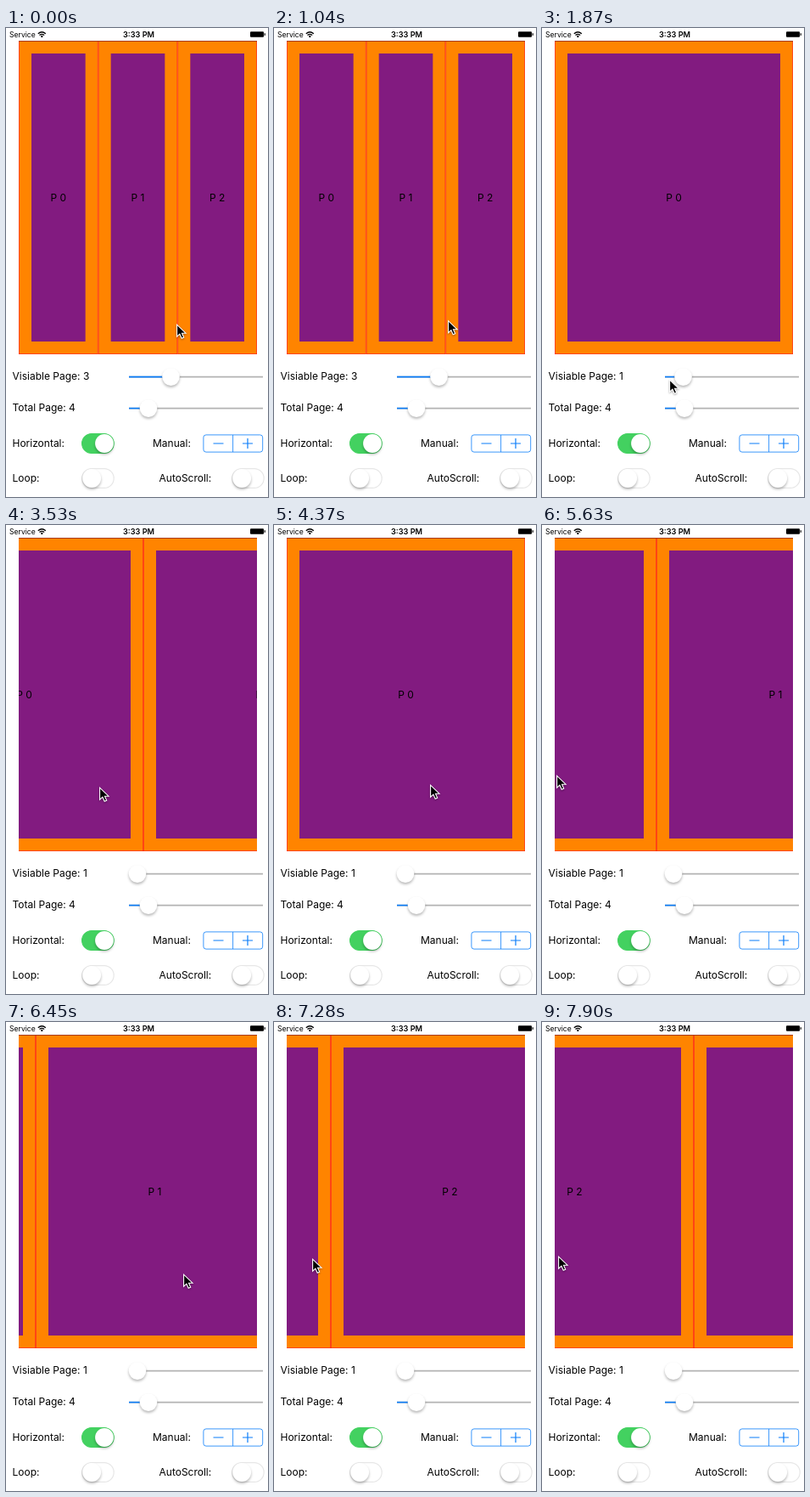
An HTML page for the animation above (8 s loop, 309 by 552 pixels).

```html
<!DOCTYPE html>
<html lang="en">
<head>
<meta charset="utf-8">
<title>Pager demo</title>
<style>
html, body { margin: 0; width: 100%; height: 100%; overflow: hidden; background: #fff; }
svg { display: block; width: 100vw; height: 100vh; }
text { font: 12px Inter, Roboto, sans-serif; fill: #000; }
.status { font-size: 8.6px; }
.clock { font-size: 9.2px; font-weight: 600; }
.middle { text-anchor: middle; }
.knob { fill: #fff; filter: drop-shadow(0 2px 1.5px rgba(0, 0, 0, .28)); }
.blue { fill: none; stroke: #0a7dfa; stroke-width: .8; }
#cursor { fill: #000; stroke: #fff; stroke-width: 1.1; filter: drop-shadow(0 1px 1px rgba(0, 0, 0, .35)); }
</style>
</head>
<body>
<svg viewBox="0 0 309 552">
  <defs><clipPath id="view"><rect x="15" y="15" width="281" height="369"/></clipPath></defs>

  <text class="status" x="4" y="11">Service</text>
  <g fill="none" stroke="#000" stroke-width="1.3">
    <path d="M37.8 6.8Q42.3 2.8 46.8 6.8M39.5 8.6Q42.3 6.2 45.1 8.6"/>
    <circle cx="42.3" cy="10" r=".5"/>
  </g>
  <text class="clock middle" x="156.5" y="11">3:33 PM</text>
  <rect x="288" y="4.3" width="16" height="6.4" rx="1"/>
  <rect x="304.6" y="6.2" width="1.2" height="2.6"/>

  <g clip-path="url(#view)">
    <g id="pages"></g>
    <path d="M15 15.5H296" stroke="#a83a10"/>
  </g>

  <text id="visible" x="7.5" y="414"></text>
  <text x="7.5" y="451">Total Page: 4</text>
  <text x="7.5" y="493">Horizontal:</text>
  <text x="173" y="493">Manual:</text>
  <text x="7.5" y="534">Loop:</text>
  <text x="180.5" y="534">AutoScroll:</text>

  <g class="blue">
    <rect x="232.9" y="478.9" width="69.8" height="20.2" rx="3"/>
    <path d="M267.6 479V499"/>
    <path d="M244.5 489H256.5M279 489H291M285 483V495" stroke-width="1.2"/>
  </g>
  <g id="controls"></g>
  <path id="cursor" d="M.6 1.2V15.2L3.9 12.2 6.2 17.3 8.7 16.2 6.5 11.2H11Z"/>
</svg>
<script>
const LOOP = 8000, TICK = 208;
const LEFT = 15, WIDTH = 281, PAGE_COUNT = 4;
const DRAG_GAIN = 1.1, SETTLE_RATE = 2, REST_GAP = 20;

// Where the pointer turns: tick, x, y.
const STOPS = [
  [1, 201, 348], [4, 213, 279], [6, 197, 408], [9, 150, 413], [12, 146, 420], [15, 232, 312],
  [17, 110, 308], [21, 184, 305], [24, 163, 299], [27, 17, 294], [28, 16, 294], [31, 209, 296],
  [33, 271, 284], [35, 45, 278], [37, 144, 276], [38, 19, 275]
];
const DRAGS = [
  { from: 15, to: 17, page: 0 },
  { from: 24, to: 28, page: 1 },
  { from: 33, to: 35, page: 2 },
  { from: 37, to: 38, page: 2 }
];

const $ = id => document.getElementById(id);
const clamp = v => Math.min(1, Math.max(0, v));
const mix = (a, b, p) => a + (b - a) * p;
const ease = p => (1 - Math.cos(Math.PI * p)) / 2;

function set(node, attrs) {
  for (const name in attrs) node.setAttribute(name, attrs[name]);
}

function add(parent, tag, attrs, text = '') {
  const node = document.createElementNS('http://www.w3.org/2000/svg', tag);
  set(node, attrs);
  node.textContent = text;
  return parent.appendChild(node);
}

function pointer(tick) {
  const next = STOPS.findIndex(stop => stop[0] > tick);
  const b = STOPS[next < 0 ? STOPS.length - 1 : next];
  const a = STOPS[next < 0 ? STOPS.length - 1 : Math.max(0, next - 1)];
  const p = a === b ? 0 : ease((tick - a[0]) / (b[0] - a[0]));
  return { x: mix(a[1], b[1], p), y: mix(a[2], b[2], p) };
}

// Pages follow the pointer during a drag, then settle just short of a page.
function scrollOffset(tick) {
  let offset = 0;
  for (const { from, to, page } of DRAGS) {
    if (tick < from) break;
    offset += DRAG_GAIN * (pointer(from).x - pointer(Math.min(tick, to)).x);
    const rest = page && page * WIDTH - REST_GAP;
    const next = DRAGS.find(drag => drag.from >= to);
    const settled = Math.min(tick, next ? next.from : tick) - to;
    if (settled > 0) offset = mix(rest, offset, Math.exp(-SETTLE_RATE * settled));
  }
  return Math.round(offset);
}

function makeSlider(y) {
  const g = $('controls');
  add(g, 'path', { d: `M145 ${y}H303`, stroke: '#b3b3b3', 'stroke-width': 1.6 });
  const fill = add(g, 'path', { stroke: '#0a7dfa', 'stroke-width': 1.6 });
  const knob = add(g, 'circle', { class: 'knob', cy: y, r: 10.3 });
  return x => {
    set(fill, { d: `M145 ${y}H${x}` });
    set(knob, { cx: x });
  };
}

function makeSwitch(x, y, on) {
  const g = $('controls');
  add(g, 'rect', {
    x: x + .6, y: y - 11.4, width: 37.6, height: 22.8, rx: 11.4,
    fill: on ? '#43d160' : '#fff', stroke: on ? '#43d160' : '#e7e7e7', 'stroke-width': 1.2
  });
  add(g, 'circle', { class: 'knob', cx: x + (on ? 27 : 12.2), cy: y, r: 10.9 });
}

function makePage(index) {
  const g = add($('pages'), 'g', {});
  const frame = add(g, 'rect', { x: .4, y: 15.4, height: 368.2, fill: '#ff8400', stroke: '#ff2a00', 'stroke-width': .8 });
  const body = add(g, 'rect', { x: 15, y: 30, height: 339, fill: '#821b80' });
  const label = add(g, 'text', { class: 'middle', y: 203.5 }, 'P ' + index);
  return (width, offset) => {
    set(g, { transform: `translate(${LEFT + index * width - offset})` });
    set(frame, { width: width - .8 });
    set(body, { width: width - 30 });
    set(label, { x: width / 2 });
  };
}

const pages = Array.from({ length: PAGE_COUNT }, (_, i) => makePage(i));
const moveVisible = makeSlider(410.6);
makeSlider(447.6)(168);
makeSwitch(89, 489, true);
makeSwitch(89, 530, false);
makeSwitch(266, 530, false);

function render(time) {
  const tick = Math.floor((time % LOOP + 6) / TICK);
  const { x, y } = pointer(tick);
  const thumb = mix(194.5, 155, clamp((tick - 6) / 4) ** 1.2);
  const value = 1 + 7 * (thumb - 155) / 138;
  const shown = Math.floor(value + .4); // the view lags the label

  pages.forEach(place => place(WIDTH / shown, scrollOffset(tick)));
  moveVisible(thumb);
  $('visible').textContent = 'Visiable Page: ' + Math.floor(value);
  set($('cursor'), { transform: `translate(${x} ${y})` });
}

const start = performance.now();
function loop() {
  render(performance.now() - start);
  requestAnimationFrame(loop);
}
loop();
</script>
</body>
</html>
```
